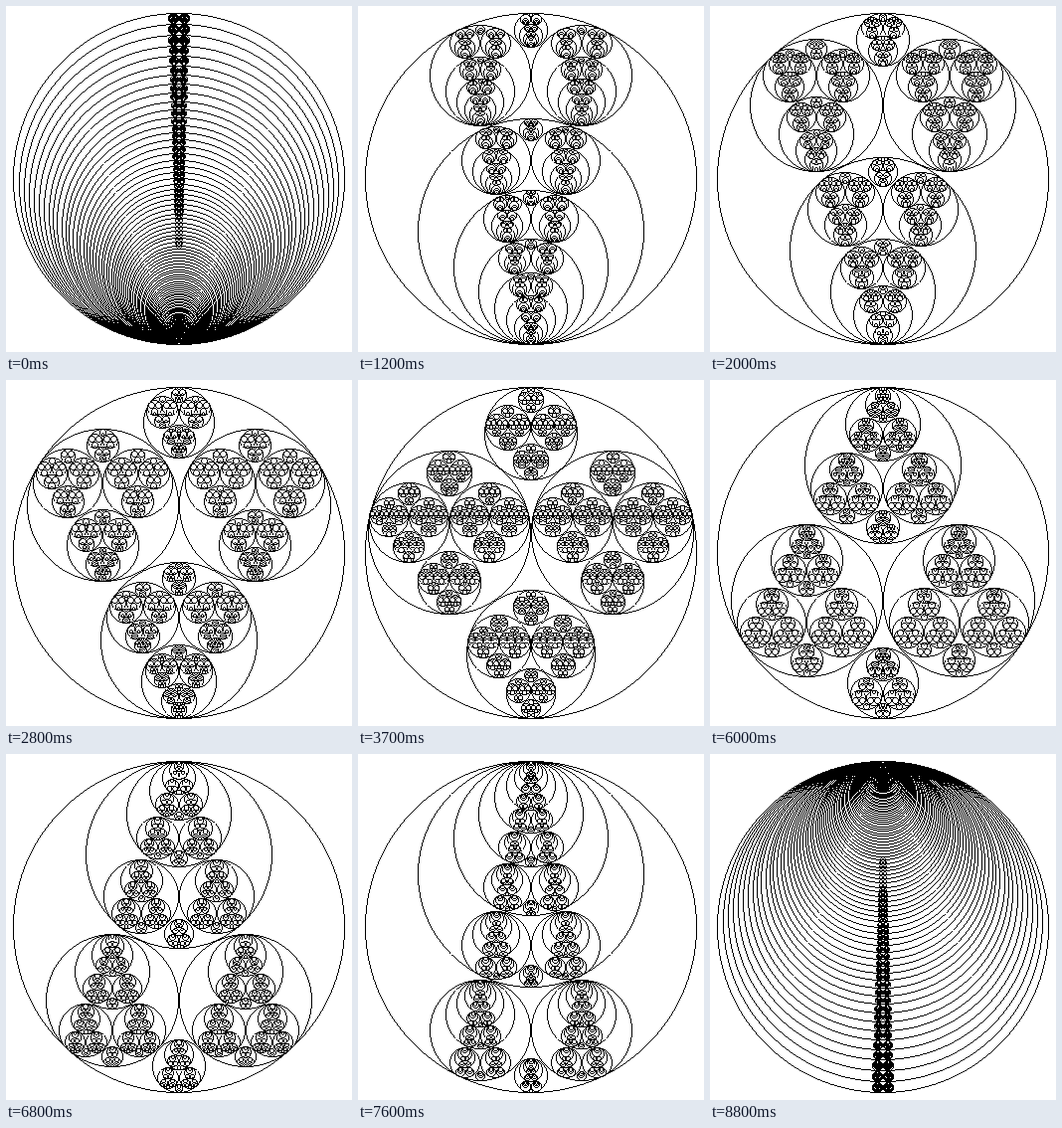
Recreate the animation shown at these times as an HTML page with a canvas. Size 348 px wide and 348 px high, loop 8.9 s.

```html
<!DOCTYPE html>
<html lang="en">
<head>
<meta charset="utf-8">
<title>Nested tangent circles</title>
<style>
  html, body { margin: 0; width: 100%; height: 100%; overflow: hidden; background: #fff; }
  canvas { display: block; width: 348px; height: 348px; image-rendering: pixelated; }
</style>
</head>
<body>
<canvas id="stage" width="348" height="348"></canvas>
<script>
const SIZE = 348;
const CENTER = SIZE / 2;
const RADIUS = 167;
const MIN_RADIUS = RADIUS * 0.01;
const STEP_MS = 100;
const STEPS = 89;
const BLACK = 0xff000000;
const WHITE = 0xffffffff;

const ctx = document.getElementById('stage').getContext('2d');
const image = ctx.createImageData(SIZE, SIZE);
const pixels = new Uint32Array(image.data.buffer);

function plot(x, y) {
  pixels[Math.floor(y) * SIZE + Math.floor(x)] = BLACK;
}

// Snaps an extent to whole pixels; the outline runs through pixel centers.
function snap(center, r) {
  const from = Math.round(center - r);
  const to = Math.round(center + r);
  return { mid: (from + to) / 2, half: (to - from - 1) / 2 };
}

// Walks the pixels along one axis where the outline is shallow and
// reports the offset across to the curve.
function scan(along, across, visit) {
  const reach = along.half ** 2 / Math.hypot(along.half, across.half);
  for (let p = Math.ceil(along.mid - reach - 0.5); p + 0.5 <= along.mid + reach; p++) {
    const t = (p + 0.5 - along.mid) / along.half;
    visit(p, across.half * Math.sqrt(1 - t * t));
  }
}

function outline(cx, cy, r) {
  const h = snap(cx, r);
  const v = snap(cy, r);
  scan(h, v, (x, dy) => { plot(x, v.mid - dy); plot(x, v.mid + dy); });
  scan(v, h, (y, dx) => { plot(h.mid - dx, y); plot(h.mid + dx, y); });
}

// Four mutually tangent circles in a unit circle; the side pair touches
// the rim at the given angle above the horizontal.
function arrangement(angle) {
  const h = Math.tan(angle / 2);
  const side = (1 - h * h) / 2;
  const top = (1 - h) / (3 + h);
  const bottom = (1 + h) / (3 - h);
  return [
    { x: -side, y: -h, r: side },
    { x: side, y: -h, r: side },
    { x: 0, y: top - 1, r: top },
    { x: 0, y: 1 - bottom, r: bottom }
  ];
}

function nest(cx, cy, r, children) {
  if (r < MIN_RADIUS) return;
  outline(cx, cy, r);
  for (const c of children) nest(cx + c.x * r, cy + c.y * r, c.r * r, children);
}

function draw(step) {
  const degrees = 88 - 2 * step;
  pixels.fill(WHITE);
  nest(CENTER, CENTER, RADIUS, arrangement(degrees * Math.PI / 180));
  ctx.putImageData(image, 0, 0);
}

const start = performance.now();
let shown = -1;

function tick() {
  const step = Math.floor((performance.now() - start) / STEP_MS) % STEPS;
  if (step !== shown) draw(shown = step);
  requestAnimationFrame(tick);
}
tick();
</script>
</body>
</html>
```
